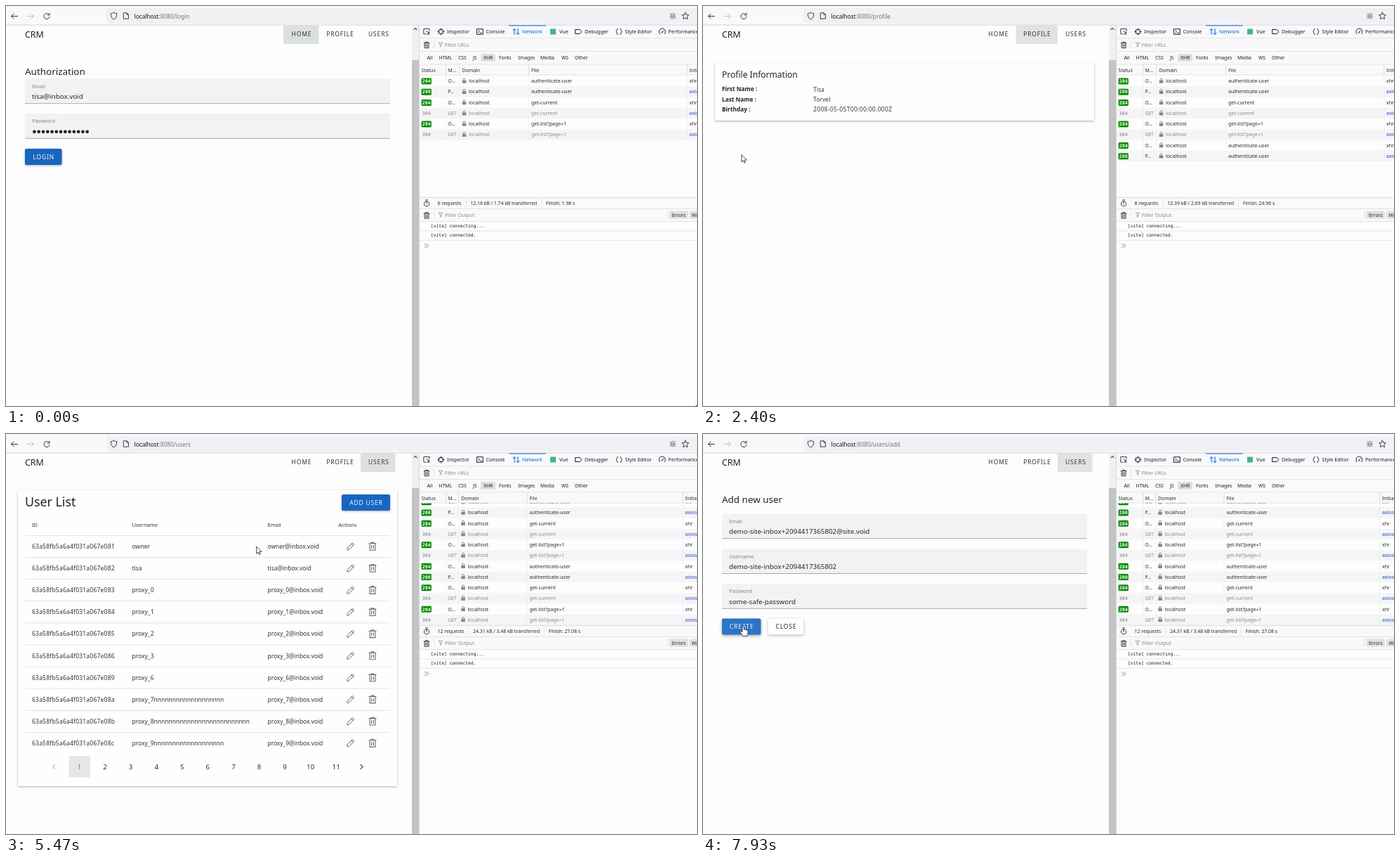
An HTML page with a canvas that plays this animation: 984 by 569 pixels, repeating every 8000 ms.

```html
<!DOCTYPE html>
<html lang="en">
<head>
<meta charset="utf-8">
<title>CRM</title>
<style>
html, body { margin: 0; width: 100%; height: 100%; overflow: hidden; background: #fdfdfd; }
canvas { display: block; width: 984px; height: 569px; }
</style>
</head>
<body>
<canvas id="stage"></canvas>
<script>
const W = 984, H = 569, LOOP = 8000;
const canvas = document.getElementById('stage');
const ctx = canvas.getContext('2d');
const dpr = window.devicePixelRatio || 1;
canvas.width = W * dpr;
canvas.height = H * dpr;

const SANS = '"Noto Sans", "Open Sans", sans-serif';
const MONO = '"DejaVu Sans Mono", "Noto Sans Mono", monospace';
const INK = '#2a2a2a', SOFT = '#77777c', LINE = '#dedee1', BLUE = '#0060df', PAGE = '#fdfdfd', BAR = '#f9f9fb';

// Page changes and network activity
const SHOW_PROFILE = 2130, SHOW_USERS = 4370, SHOW_ADD = 6020;
const TRAFFIC = [
  { at: 0, rows: 6, size: '12.16 kB / 1.74 kB', finish: '1.98 s' },
  { at: 2100, rows: 8, size: '12.39 kB / 2.69 kB', finish: '24.96 s' },
  { at: 2650, rows: 10, size: '12.53 kB / 3.08 kB', finish: '25.15 s' },
  { at: SHOW_USERS, rows: 12, size: '24.31 kB / 3.48 kB', finish: '27.07 s' },
  { at: 4700, rows: 12, size: '24.31 kB / 3.48 kB', finish: '27.08 s' }
];

// Pointer keys: time, x, y
const POINTER = [
  [0, 983, 568], [30, 983, 568], [670, 580, 300], [970, 580, 300], [1330, 101, 184],
  [1700, 55, 212], [2630, 55, 212], [3430, 478, 48], [3570, 510, 40], [3800, 523, 49],
  [4230, 527, 37], [5130, 527, 37], [5520, 349, 166], [5900, 477.5, 106.5],
  [6800, 477.5, 106.5], [7600, 74, 277], [7900, 57, 273], [8000, 57, 273]
];

const clamp = v => Math.max(0, Math.min(1, v));
const mix = (a, b, k) => a + (b - a) * k;
const smooth = k => k * k * (3 - 2 * k);
const blend = (a, b, k) => `rgb(${a.map((v, i) => Math.round(mix(v, b[i], k)))})`;
const pulse = (t, a, b, c, d) => clamp((t - a) / (b - a)) * clamp((d - t) / (d - c));
const inside = (p, [x, y, w, h]) => p.x >= x && p.x < x + w && p.y >= y && p.y < y + h;

function pointerAt(t) {
  let i = 1;
  while (i < POINTER.length - 1 && POINTER[i][0] < t) i++;
  const [t0, x0, y0] = POINTER[i - 1], [t1, x1, y1] = POINTER[i];
  const k = smooth(clamp((t - t0) / (t1 - t0)));
  return { x: mix(x0, x1, k), y: mix(y0, y1, k) };
}

function text(str, x, y, size, color = INK, { weight = 400, gap = 0, align = 'left', font = SANS } = {}) {
  ctx.font = `${weight} ${size}px ${font}`;
  ctx.letterSpacing = gap + 'px';
  ctx.textAlign = align;
  ctx.fillStyle = color;
  ctx.fillText(str, x, y);
  return ctx.measureText(str).width;
}

function rect(x, y, w, h, color) {
  ctx.fillStyle = color;
  ctx.fillRect(x, y, w, h);
}

function box(x, y, w, h, r, color) {
  ctx.beginPath();
  ctx.roundRect(x, y, w, h, r);
  ctx.fillStyle = color;
  ctx.fill();
}

function shadowBox(x, y, w, h, r, color, depth = 1) {
  ctx.save();
  ctx.shadowColor = 'rgba(0,0,0,.32)';
  ctx.shadowBlur = 3 * depth * dpr;
  ctx.shadowOffsetY = depth * dpr;
  box(x, y, w, h, r, color);
  ctx.restore();
}

function icon(x, y, path, color = '#38383d', width = 1, fill) {
  ctx.save();
  ctx.translate(x, y);
  const p = new Path2D(path);
  if (fill) { ctx.fillStyle = fill; ctx.fill(p); }
  if (width) {
    ctx.strokeStyle = color;
    ctx.lineWidth = width;
    ctx.lineJoin = ctx.lineCap = 'round';
    ctx.stroke(p);
  }
  ctx.restore();
}

const ICON = {
  arrow: 'M4.5 0H-4.5M-1 -3.5L-4.5 0L-1 3.5',
  reload: 'M3.6 -2A4.1 4.1 0 1 0 4.1 .8M4 -4.4V-1.6H1.2',
  shield: 'M0 -4.8C1.5 -3.6 3 -3.4 4.2 -3.4C4.4 1.2 3 3.4 0 5C-3 3.4 -4.4 1.2 -4.2 -3.4C-3 -3.4 -1.5 -3.6 0 -4.8Z',
  sheet: 'M-3.4 -4.2H1L3.4 -1.8V4.2H-3.4ZM1 -4.2V-1.8H3.4',
  star: 'M0 -4.8L1.5 -1.6L4.9 -1.2L2.4 1.2L3 4.6L0 2.9L-3 4.6L-2.4 1.2L-4.9 -1.2L-1.5 -1.6Z',
  bug: 'M-2.2 -1.5A2.2 2.2 0 0 1 2.2 -1.5V1.8A2.2 2.2 0 0 1 -2.2 1.8ZM-4.3 -3L-2.2 -1.5M4.3 -3L2.2 -1.5M-4.5 .6H4.5M-4.2 4L-2 2.4M4.2 4L2 2.4M-2 -1H2M-2 2H2',
  bin: 'M-3.8 -3H3.8M-1.4 -3V-4.3H1.4V-3M-3 -3V4.2H3V-3M-1 -1.2V2.6M1 -1.2V2.6',
  funnel: 'M-2.8 -2.8H2.8L.7 0V2.6L-.7 3.2V0Z',
  pick: 'M4 -1V-4H-4.2V3.4H-1M0 -.5L4.3 1.5L2.3 2.2L4 4.2M2.3 2.2L1.2 4Z',
  inspect: 'M-2.7 -2.7H2.7V2.7H-2.7ZM0 -4.6V-2.7M0 4.6V2.7M-4.6 0H-2.7M4.6 0H2.7',
  prompt: 'M-4.3 -3.8H4.3V3.8H-4.3ZM-2.3 -1.6L-.6 0L-2.3 1.6M.4 1.8H2.4',
  traffic: 'M-2.5 4V-4M-4.7 -1.8L-2.5 -4L-.3 -1.8M2.5 -4V4M.3 1.8L2.5 4L4.7 1.8',
  tag: 'M-4.5 -3H1.5L4.6 0L1.5 3H-4.5Z',
  braces: 'M-1.7 -4C-4 -4 -2.2 -.5 -4.3 0C-2.2 .5 -4 4 -1.7 4M1.7 -4C4 -4 2.2 -.5 4.3 0C2.2 .5 4 4 1.7 4',
  gauge: 'M-3.4 3.2A4.6 4.6 0 1 1 3.4 3.2M-.6 1.2L2 -1.8M-.6 1.2H.6',
  watch: 'M0 -2.9A3.7 3.7 0 1 1 -.01 -2.9M-1.4 -4.7H1.4M0 -2.6V.8',
  lock: 'M-1.6 -.6V-2A1.6 1.6 0 0 1 1.6 -2V-.6',
  pencil: 'M-5 5V2.6L2.3 -4.7L4.7 -2.3L-2.6 5ZM.8 -3.2L3.2 -.8'
};

function browserBar(path) {
  rect(0, 0, W, 27, BAR);
  box(143, 3, 860, 22, 3, '#f1f1f5');
  rect(0, 26.5, W, 1, '#d3d3d9');
  icon(12, 14.5, ICON.arrow);
  ctx.save();
  ctx.scale(-1, 1);
  icon(-35, 14.5, ICON.arrow, '#bdbdc2');
  ctx.restore();
  icon(58, 14.5, ICON.reload);
  icon(153.5, 14, ICON.shield);
  icon(171, 14, ICON.sheet);
  const w = text('localhost', 182.5, 17.5, 8.3, '#15141a');
  text(':8080' + path, 182.5 + w, 17.5, 8.3, '#74747c');
  icon(949.5, 14, ICON.bug, '#85858a', .9);
  icon(967.5, 14, ICON.star);
}

function scrollbar() {
  rect(578, 27.5, 10, H, '#f0f0f0');
  rect(578, 77, 10, H, '#c4c4c4');
  icon(583, 32.5, 'M-2.2 1.2L0 -1L2.2 1.2', '#505050', 1.1);
}

const TABS = [
  ['Inspector', 628, 619.5, 'inspect'], ['Console', 683.5, 675, 'prompt'], ['Network', 735, 726.5, 'traffic'],
  ['Vue', 788, 0, ''], ['Debugger', 824, 815.5, 'tag'], ['Style Editor', 881.5, 873, 'braces'], ['Performance', 943, 934.5, 'gauge']
];
const FILTERS = [['All', 599.5], ['HTML', 616.5], ['CSS', 644], ['JS', 665], ['XHR', 680],
  ['Fonts', 702], ['Images', 729.5], ['Media', 761], ['WS', 791], ['Other', 810]];

function toolbars() {
  rect(588, 27, 396, 71, BAR);
  for (const y of [45.5, 64, 82.5]) rect(588, y, 396, .8, LINE);
  icon(599, 36.5, ICON.pick);
  for (const [name, x, ix, key] of TABS) {
    const color = name === 'Network' ? BLUE : '#1c1b22';
    text(name, x, 39, 7.15, color);
    if (key) icon(ix, 36.5, ICON[key], color);
  }
  rect(716, 27, 53, 1.4, BLUE);
  rect(775, 32.5, 8, 8, '#41b883');
  icon(599, 55.5, ICON.bin);
  rect(609, 49, .8, 12, LINE);
  icon(619, 55, ICON.funnel, '#8f8f96', .8);
  text('Filter URLs', 624.5, 57.7, 7, '#8b8b92');
  box(676, 68, 21, 11, 1.5, '#e0e0e3');
  for (const [name, x] of FILTERS) text(name, x, 76, 6.8, '#1c1b22');
}

function requestRow(i, y, cols) {
  const file = ['authenticate-user', 'get-current', 'get-list?page=1'][(i >> 1) % 3];
  const odd = i % 2 === 1, post = file === 'authenticate-user', cached = odd && !post;
  const color = cached ? '#8a8a8f' : '#2b2b30', base = y + 2.5;
  if (odd) rect(589, y - 7.6, 395, 15.25, '#f5f5f7');
  if (!cached) box(591.5, y - 4.3, 14.3, 9, 1.5, '#058b00');
  text(cached ? '304' : odd ? '200' : '204', 592.8, y + 2.5, 6.5, cached ? '#77777c' : '#fff',
    { font: MONO, weight: cached ? 400 : 700 });
  text(cached ? 'GET' : odd ? 'P...' : 'O...', 629.5, base, 6.7, color);
  const lx = cols.domain + 3;
  icon(lx, y, ICON.lock, '#85858a', 1);
  box(lx - 2.8, y - .9, 5.6, 4, .6, '#85858a');
  text('localhost', cols.domain + 9.5, base, 7, color);
  text(file, cols.file, base, 7, color);
  text(odd ? 'axios' : 'xhr', cols.start, base, 7, odd ? '#1749c9' : '#2b2b30');
}

function network(info) {
  const full = info.rows === 12;
  const cols = full
    ? { domain: 648, file: 745.5, start: 967, lines: [626, 644, 741.5, 963.5] }
    : { domain: 649.5, file: 748, start: 973, lines: [626, 645, 744, 969.5] };
  const top = 106.7 - (full ? 10.2 : 0);
  ctx.save();
  ctx.beginPath();
  ctx.rect(588, 98, 396, 174);
  ctx.clip();
  for (let i = 0; i < info.rows; i++) requestRow(i, top + i * 15.25, cols);
  ctx.restore();
  const end = Math.min(272, top + info.rows * 15.25 - 7.6);
  for (const x of cols.lines) {
    rect(x, 98, .7, end - 98, '#ececef');
    rect(x, 83, .8, 15, '#d8d8dc');
  }
  rect(588, 97.6, 396, .8, LINE);
  text('Status', 591.5, 93.5, 6.9);
  text('M...', 629.5, 93.5, 6.9);
  text('Domain', cols.domain, 93.5, 6.9);
  text('File', cols.file, 93.5, 6.9);
  text('Initiator', cols.start, 93.5, 6.9);

  rect(588, 272, 396, 16.5, BAR);
  rect(588, 271.8, 396, .8, '#d4d4d8');
  icon(599, 280.5, ICON.watch);
  const shift = info.rows > 9 ? 3.8 : 0;
  text(info.rows + ' requests', 614.5, 283.2, 6.9);
  text(info.size + ' transferred', 661.3 + shift, 283.2, 6.85);
  text('Finish: ' + info.finish, 769 + shift, 283.2, 6.9);
  for (const x of [655, 762]) rect(x + shift, 275, .8, 11, LINE);
}

function consolePane() {
  rect(588, 288.5, 396, 17.5, BAR);
  for (const y of [288, 306, 319.5, 332.8]) rect(588, y, 396, .8, LINE);
  icon(599, 298, ICON.bin);
  rect(609, 291, .8, 12, LINE);
  icon(619, 297, ICON.funnel, '#8f8f96', .8);
  text('Filter Output', 625, 299.7, 7, '#8b8b92');
  rect(941.5, 291, .8, 12, LINE);
  box(944.5, 291.5, 26.5, 11, 1.5, '#e0e0e3');
  box(973, 291.5, 36, 11, 1.5, '#e0e0e3');
  text('Errors', 948, 299.7, 6.9);
  text('Warnings', 976.5, 299.7, 6.9);
  text('[vite] connecting...', 605, 315.2, 6.3, '#1c1b22', { font: MONO });
  text('[vite] connected.', 605, 328.4, 6.3, '#1c1b22', { font: MONO });
  icon(599, 341, 'M-2.8 -2.8L0 0L-2.8 2.8M.4 -2.8L3.2 0L.4 2.8', '#85858f', .9);
}

const CAPS = { gap: .82, align: 'center' };
const NAV = [['HOME', 395, 50.5, 420.9], ['PROFILE', 445.5, 59.5, 475.9], ['USERS', 505, 49.5, 530.9]];

function nav(page, t, p) {
  text('CRM', 27, 44.5, 12.4, '#1f1f1f');
  const active = { login: 0, profile: 1, users: 2, add: 2 }[page];
  const gray = [226, 226, 226];
  const tint = [
    [[218, 225, 221], t < 30 ? 1 : 0],
    [[200, 218, 211], pulse(t, 3150, 3300, 3650, 4100)],
    [[167, 199, 188], pulse(t, 4300, 4450, 5130, 5500)]
  ];
  NAV.forEach(([name, x, w, cx], i) => {
    if (i === active) rect(x, 27.5, w, 26.5, blend(gray, ...tint[i]));
    else if (inside(p, [x, 27.5, w, 26.5])) rect(x, 27.5, w, 26.5, '#f4f4f4');
    text(name, cx, 42.6, 8.5, '#333', CAPS);
  });
}

const BUTTONS = {
  login: [['LOGIN', 27, 203, 52.5, 23]],
  profile: [],
  users: [['ADD USER', 478, 86, 69, 23]],
  add: [['CREATE', 27, 262.5, 55.5, 23], ['CLOSE', 92.5, 262.5, 51, 23]]
};
const FIELDS = { login: [103.5, 153], profile: [], users: [], add: [113.5, 163.3, 213] };

function buttons(page, p) {
  for (const [name, ...area] of BUTTONS[page]) {
    const [x, y, w, h] = area, plain = name === 'CLOSE', hover = inside(p, area);
    const fill = plain ? (hover ? '#f4f4f4' : '#fefefe') : hover ? '#2b74c6' : '#1766c0';
    shadowBox(x, y, w, h, 2.6, fill, hover ? 1.8 : 1.1);
    text(name, x + w / 2 + .4, y + 14.9, 8.5, plain ? '#2a2a2a' : '#f4f8fd', CAPS);
  }
}

function field(y, label, value) {
  box(27, y, 520, 35.5, [2.6, 2.6, 0, 0], '#f2f2f1');
  rect(27, y + 34.8, 520, .9, '#a3a3aa');
  text(label, 37.3, y + 13.3, 7.2, '#808084');
  if (value) text(value, 37, y + 28.7, 9.8, '#262626');
}

function loginPage() {
  text('Authorization', 27, 98, 13.45, '#222');
  const [a, b] = FIELDS.login;
  field(a, 'Email', 'tisa@inbox.void');
  field(b, 'Password');
  ctx.fillStyle = '#1f1f1f';
  for (let i = 0; i < 13; i++) {
    ctx.beginPath();
    ctx.arc(40.4 + i * 6.27, 178.8, 2.35, 0, 7);
    ctx.fill();
  }
}

function profilePage() {
  shadowBox(17, 81, 540, 82, 2.6, '#fefefe');
  text('Profile Information', 27, 101.8, 12.05, '#222');
  [['First Name :', 'Tisa', 0], ['Last Name :', 'Torvel', 0], ['Birthday :', '2008-05-05T00:00:00.000Z', .28]]
    .forEach(([label, value, gap], i) => {
      const y = 121.4 + i * 14.1;
      text(label, 27, y, 8.3, '#222', { weight: 600 });
      text(value, 157, y + .6, 8.6, '#3a3a3a', { gap });
    });
}

const USERS = [['1', 'owner'], ['2', 'tisa'],
  ...[0, 1, 2, 3, 6, 7, 8, 9].map(n => ['3456789abc'[n < 4 ? n : n - 0], 'proxy_' + n])];
const TAIL = { proxy_7: 19, proxy_8: 26, proxy_9: 19 };

function usersPage() {
  shadowBox(17, 80, 540, 421, 2.6, '#fefefe');
  text('User List', 27, 103.4, 17.8, '#222');
  [['ID', 37], ['Username', 179.5], ['Email', 372.5], ['Actions', 473.5]]
    .forEach(([name, x]) => text(name, x, 132.2, 7.5, '#333'));
  USERS.forEach(([digit, name], i) => {
    const y = 160 + i * 31.1, base = y + 3;
    rect(27, y - 16, 520, .8, '#dcdcde');
    text('63a58fb5a6a4f031a067e08' + digit, 37, base, 8.5, '#333', { gap: .21 });
    text(name + 'n'.repeat(TAIL[name] || 0), 179.5, base, 8.5, '#333');
    text(name + '@inbox.void', 372.5, base, 8.4, '#333');
    icon(491, y - .5, ICON.pencil, '#666', 1);
    icon(522, y, 'M-5 -4.2H5M-2 -4.2V-5.6H2V-4.2M-4 -4.2V5.2H4V-4.2M-1.4 -1.5V2.6M1.4 -1.5V2.6', '#666', 1.1);
  });
  box(89.5, 458, 30.5, 30.5, 2.6, '#e6e6e6');
  icon(68, 473.3, 'M1.5 -3L-1.5 0L1.5 3', '#b5b5b5', 1.1);
  icon(506.5, 473.3, 'M-1.5 -3L1.5 0L-1.5 3', '#333', 1.2);
  for (let n = 1; n <= 11; n++) {
    text(String(n), 104.5 + (n - 1) * 36.58, 477, 9.6, n === 1 ? '#777' : '#2a2a2a', { align: 'center', gap: .2 });
  }
}

function addPage() {
  text('Add new user', 27, 98, 13.45, '#222');
  const [a, b, c] = FIELDS.add, name = 'demo-site-inbox+2094417365802';
  field(a, 'Email', name + '@site.void');
  field(b, 'Username', name);
  field(c, 'Password', 'some-safe-password');
}

function pointer(page, p) {
  const hand = NAV.some(([, x, w]) => inside(p, [x, 27.5, w, 26.5])) ||
    BUTTONS[page].some(([, ...area]) => inside(p, area));
  const beam = FIELDS[page].some(y => inside(p, [27, y, 520, 35.5]));
  if (hand) {
    icon(p.x, p.y, 'M-1 8.5V1A1.2 1.2 0 0 1 1.4 1V5.2C2 4.6 3.3 4.8 3.5 5.6C4.2 5 5.2 5.3 5.4 6.2C6.2 5.8 7 6.3 7 7.2V10.5C7 12 6.2 13 6 14.6H-.2C-.6 13 -2.4 11.4 -4 9C-4.6 7.8 -3 7 -2 7.8Z',
      '#333', .9, '#fff');
  } else if (beam) {
    icon(p.x, p.y, 'M-2 -5H-.6L0 -4.5L.6 -5H2M0 -4.5V4.5M-2 5H-.6L0 4.5L.6 5H2', '#222', .9);
  } else {
    icon(p.x, p.y, 'M0 0V9.8L2.3 7.7L3.9 11.3L5.4 10.6L3.9 7.1H7Z', '#333', .9, '#fff');
  }
}

const PAGES = { login: loginPage, profile: profilePage, users: usersPage, add: addPage };
const PATHS = { login: '/login', profile: '/profile', users: '/users', add: '/users/add' };

function draw(t) {
  const page = t < SHOW_PROFILE ? 'login' : t < SHOW_USERS ? 'profile' : t < SHOW_ADD ? 'users' : 'add';
  const p = pointerAt(t);
  ctx.setTransform(dpr, 0, 0, dpr, 0, 0);
  rect(0, 0, W, H, PAGE);
  PAGES[page]();
  buttons(page, p);
  nav(page, t, p);
  scrollbar();
  toolbars();
  network(TRAFFIC.filter(s => s.at <= t).pop());
  consolePane();
  rect(588, 27, .9, H, '#d4d4d8');
  browserBar(PATHS[page]);
  pointer(page, p);
}

const start = performance.now();
function tick() {
  draw((performance.now() - start) % LOOP);
  requestAnimationFrame(tick);
}
tick();
</script>
</body>
</html>
```
